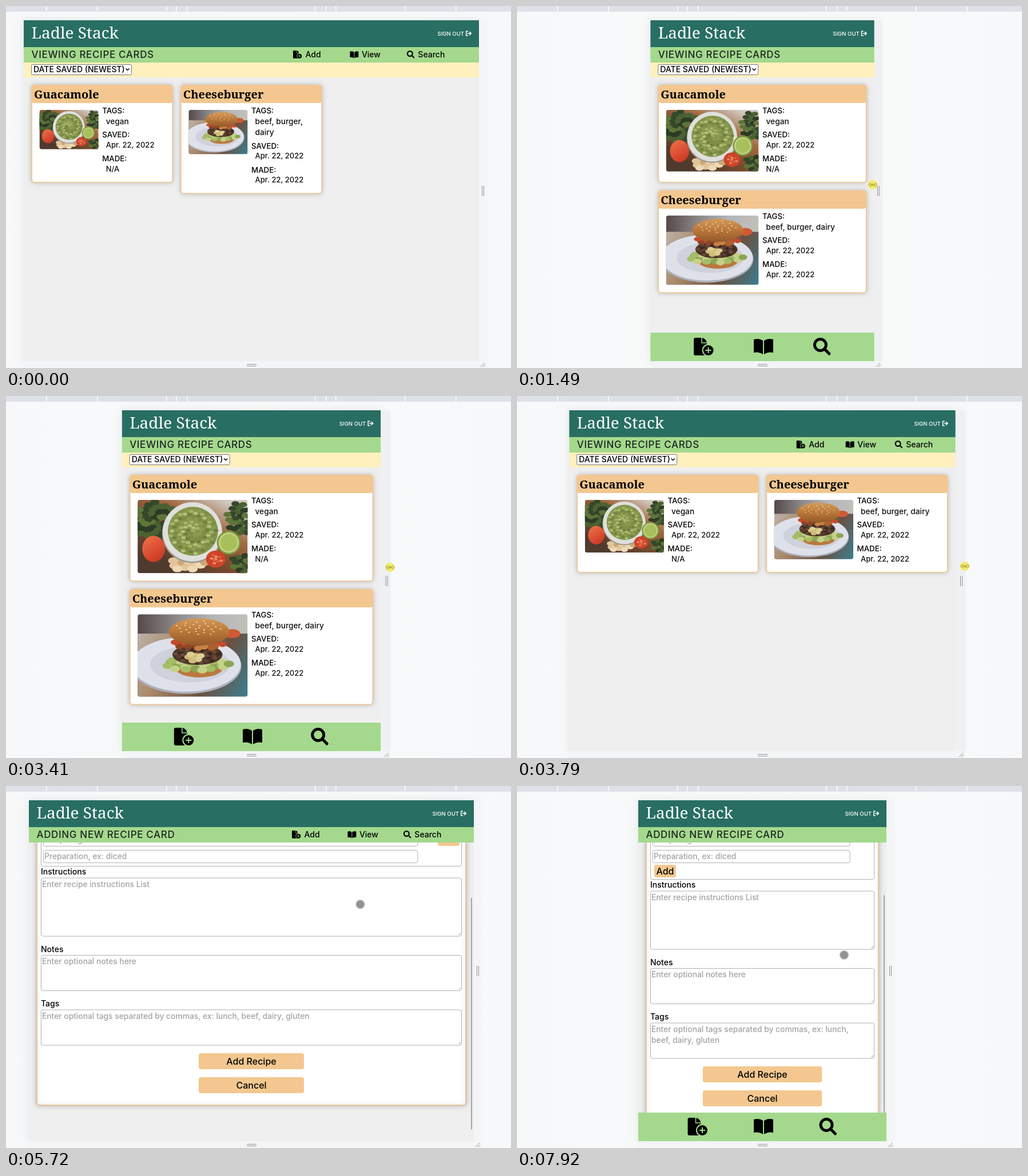
Recreate the animation shown at these times as an HTML page with a canvas. Size 883 px wide and 634 px high, loop 7990 ms.

```html
<!DOCTYPE html>
<html lang="en">
<head>
<meta charset="utf-8">
<title>Recipe cards</title>
<style>
  html, body { margin: 0; width: 100%; height: 100%; overflow: hidden; background: #f7f9f9; }
  canvas { display: block; }
</style>
</head>
<body>
<canvas id="stage" width="883" height="634"></canvas>
<script>
const ctx = document.getElementById('stage').getContext('2d');
const LOOP = 7990, MID = 429, TOP = 25, BOTTOM = 622, LAG = 45;
const ORANGE = '#f3c78f', GREEN = '#a4d98d', TEAL = '#286e62', PAGE = '#efefef';
const SANS = 'Inter, "Open Sans", sans-serif', SERIF = '"Noto Serif", serif';

// The pointer's path; the page edge follows it while it drags.
const move = (start, end, x, y) => ({ start, end, x, y });
const drag = (...args) => ({ ...move(...args), drag: true });
const moves = [
  move(130, 500, 830, 314), drag(785, 1465, 622, 313), drag(1615, 2015, 554, 300),
  move(2240, 2420, 511, 297), move(2700, 2850, 554, 302),
  drag(3010, 3815, 790, 298), drag(3815, 4115, 821, 296),
  move(4240, 4460, 618, 75), move(4460, 4600, 506, 45), move(4600, 4750, 524, 91),
  move(5100, 5400, 619, 207), move(5720, 6200, 821, 325),
  drag(6265, 7065, 649, 318), move(7660, 7920, 572, 296)
];
const drags = moves.filter(m => m.drag);

const progress = (t, a, b) => Math.min(1, Math.max(0, (t - a) / (b - a)));
const smooth = (t, a, b) => {
  const k = progress(t, a, b);
  return k * k * (3 - 2 * k);
};
function follow(path, t) {
  let x = 830, y = 345;
  for (const m of path) {
    const k = progress(t, m.start, m.end);
    x += (m.x - x) * k;
    y += (m.y - y) * k;
  }
  return { x, y };
}
const edgeAt = t => follow(drags, t).x - 3;

function rect(x, y, w, h, color) {
  ctx.fillStyle = color;
  ctx.fillRect(x, y, w, h);
}
function box(x, y, w, h, r, fill, stroke, line = 1) {
  ctx.beginPath();
  ctx.roundRect(x, y, w, h, r);
  if (fill) { ctx.fillStyle = fill; ctx.fill(); }
  if (stroke) { ctx.strokeStyle = stroke; ctx.lineWidth = line; ctx.stroke(); }
}
function oval(x, y, rx, ry, color) {
  ctx.fillStyle = color;
  ctx.beginPath();
  ctx.ellipse(x, y, rx, ry, 0, 0, 7);
  ctx.fill();
}
// Spreads small ovals evenly over an ellipse.
function scatter(n, x, y, rx, ry, size, colors) {
  for (let i = 0; i < n; i++) {
    const a = i * 2.4, r = Math.sqrt(i / n);
    oval(x + rx * r * Math.cos(a), y + ry * r * Math.sin(a), size, size * .65, colors[i % colors.length]);
  }
}
function blend(x0, y0, x1, y1, ...colors) {
  const g = ctx.createLinearGradient(x0, y0, x1, y1);
  colors.forEach((c, i) => g.addColorStop(i / (colors.length - 1), c));
  return g;
}
function lines(color, width, ...segments) {
  ctx.strokeStyle = color;
  ctx.lineWidth = width;
  ctx.beginPath();
  for (const [x, y, ...rest] of segments) {
    ctx.moveTo(x, y);
    for (let i = 0; i < rest.length; i += 2) ctx.lineTo(rest[i], rest[i + 1]);
  }
  ctx.stroke();
}
function setFont(size, weight = 500, font = SANS, gap = 0) {
  ctx.font = `${weight} ${size}px ${font}`;
  ctx.letterSpacing = gap + 'px';
}
function text(s, x, y, size, { color = '#000', weight, font, align = 'left', gap } = {}) {
  setFont(size, weight, font, gap);
  ctx.textAlign = align;
  ctx.fillStyle = color;
  ctx.fillText(s, x, y);
}
// Draws wrapped text and returns the height added below the first line.
function paragraph(s, x, y, size, max, style) {
  setFont(size);
  const rows = [''];
  for (const word of s.split(' ')) {
    const joined = (rows.at(-1) + ' ' + word).trim();
    if (rows.at(-1) && ctx.measureText(joined).width > max) rows.push(word);
    else rows[rows.length - 1] = joined;
  }
  rows.forEach((row, i) => text(row, x, y + i * 19.5, size, style));
  return (rows.length - 1) * 19.5;
}
function at(x, y, scale, draw) {
  ctx.save();
  ctx.translate(x, y);
  ctx.scale(scale, scale);
  draw();
  ctx.restore();
}
function shadowed(draw) {
  ctx.save();
  ctx.shadowColor = 'rgba(0,0,0,.25)';
  ctx.shadowBlur = 9;
  draw();
  ctx.restore();
}

const icons = {
  add() {
    box(0, 0, 23, 31, [3, 10, 3, 3], '#000');
    lines(GREEN, 1.5, [14, 0, 14, 9, 23, 9]);
    oval(25.5, 22, 11, 11, GREEN);
    oval(25.5, 22, 9, 9, '#000');
    lines(GREEN, 2, [20.5, 22, 30.5, 22], [25.5, 17, 25.5, 27]);
  },
  view() {
    ctx.fillStyle = '#000';
    for (const side of [-1, 1]) {
      ctx.beginPath();
      ctx.moveTo(17 + side, 6);
      ctx.quadraticCurveTo(17 + side * 8, 1, 17 + side * 17, 4);
      ctx.lineTo(17 + side * 17, 27);
      ctx.quadraticCurveTo(17 + side * 8, 25, 17 + side, 30);
      ctx.fill();
    }
  },
  search() {
    ctx.lineCap = 'round';
    lines('#000', 5, [20, 20, 28, 28]);
    ctx.beginPath();
    ctx.arc(12.5, 12.5, 10, 0, 7);
    ctx.stroke();
  }
};

// Photos are simple scenes, 193 units wide.
const photos = {
  guacamole() {
    const leaves = ['#34482a', '#5d7539', '#2c3c25', '#4b6132'];
    rect(0, 0, 193, 129, blend(150, 0, 80, 129, '#d0c8c1', '#a26a42', '#7b4b2d', '#4f3a2d'));
    scatter(40, 30, 36, 38, 34, 8, leaves);
    scatter(30, 180, 34, 26, 30, 7, leaves);
    scatter(14, 182, 112, 18, 18, 7, leaves);
    oval(28, 86, 20, 23, blend(10, 65, 40, 110, '#ef7049', '#c93421'));
    scatter(16, 88, 112, 34, 12, 9, ['#e2c59a', '#cda878', '#eed9b5']);
    oval(96, 59, 53, 52, '#a39c90');
    oval(96, 56, 52, 52, '#dfe0dc');
    oval(97, 55, 44, 43, '#84944c');
    scatter(90, 97, 55, 41, 40, 4, ['#a5b466', '#7b8c43', '#b4c07a', '#8c9c50', '#6f803d']);
    for (const [r, color] of [[21, '#7d973b'], [18, '#c3d184'], [15, '#a9bf5c']]) oval(160, 75, r, r, color);
    oval(137, 104, 17, 15, '#cf432a');
    scatter(9, 137, 104, 11, 9, 3, ['#ee9068', '#dc6240']);
  },
  burger() {
    rect(0, 0, 193, 145, blend(0, 0, 193, 0, '#55484a', '#8a8685', '#b3b5b6', '#c2c0bc'));
    rect(0, 34, 193, 111, blend(0, 34, 193, 145, '#bdb1a6', '#a88767', '#6a5040', '#3b7f90'));
    oval(166, 34, 14, 8, '#cf5a35');
    oval(85, 91, 97, 49, '#aeb0bc');
    oval(85, 88, 96, 48, '#dfe1ea');
    oval(92, 88, 70, 32, '#cfd1dc');
    oval(108, 94, 42, 17, '#b9783d');
    scatter(36, 104, 88, 58, 11, 9, ['#a6bd67', '#8ca552', '#c4d189']);
    oval(105, 71, 44, 18, '#4d3428');
    scatter(40, 105, 71, 40, 15, 4, ['#5d4032', '#3b2820', '#6d4b38']);
    scatter(8, 100, 76, 16, 7, 7, ['#cdbd78', '#ddd094']);
    scatter(26, 108, 52, 46, 9, 7, ['#b0602f', '#c64a2b', '#8d4526', '#c98046']);
    oval(108, 31, 53, 24, blend(0, 7, 0, 55, '#d39a57', '#b97639', '#94592b'));
    scatter(26, 108, 24, 42, 13, 1.6, ['#f1d9a4']);
  }
};

function card(x, y, w, { title, photo, ratio, tags, made }) {
  const mid = x + w / 2, imgW = w / 2 - 20.5, imgH = imgW * ratio;
  const room = w / 2 - 20, style = { color: '#111' };
  setFont(13.7);
  const extra = ctx.measureText(tags).width > room ? 19.5 : 0;
  const h = Math.max(171.5 + extra, 58.5 + imgH);
  shadowed(() => box(x, y, w, h, 5, ORANGE));
  box(x + 1.5, y + 28, w - 3, h - 29.5, 4, '#fff');
  box(x, y, w, 32, 5, ORANGE);
  text(title, x + 4.5, y + 24, 20, { font: SERIF, weight: 600 });
  ctx.save();
  box(x + 14, y + 44, imgW, imgH, 4);
  ctx.clip();
  at(x + 14, y + 44, imgW / 193, photo);
  ctx.restore();
  text('TAGS:', mid, y + 50, 13.3);
  paragraph(tags, mid + 6.5, y + 68.5, 13.7, room, style);
  [['SAVED:', 'Apr. 22, 2022'], ['MADE:', made]].forEach(([label, value], i) => {
    const row = y + extra + i * 42;
    text(label, mid, row + 92, 13.3);
    text(value, mid + 6.5, row + 109.5, 13, style);
  });
  return h;
}

const recipes = [
  { title: 'Guacamole', photo: photos.guacamole, ratio: 2 / 3, tags: 'vegan', made: 'N/A' },
  { title: 'Cheeseburger', photo: photos.burger, ratio: .75, tags: 'beef, burger, dairy', made: 'Apr. 22, 2022' }
];

function cardList(left, width) {
  rect(left, 99, width, 26, '#fff0bd');
  box(left + 13.5, 102.5, 175, 18, 2, '#fff', '#767676');
  text('DATE SAVED (NEWEST)', left + 17, 116, 14);
  lines('#000', 1.5, [left + 178.5, 109.5, left + 181.5, 112.5, left + 184.5, 109.5]);
  const gap = 13.5, cols = width < 504 ? 1 : width < 685 ? 2 : 3;
  const w = (width - gap * (cols + 1)) / cols;
  let x = left + gap, y = 138;
  for (const recipe of recipes) {
    const h = card(x, y, w, recipe);
    if (cols > 1) x += w + gap;
    else y += h + gap;
  }
}

function form(left, width, narrow, scroll) {
  const x = left + 21, w = width - 42, dy = narrow ? 23 : 0;
  const field = (y, h, hint, fx = x, fw = w) => {
    box(fx + .5, y + .5, fw - 1, h, 3, '#fff', '#b0b0b0');
    paragraph(hint, fx + 2, y + 16, 13.8, fw - 20, { color: '#a3a3a3' });
  };
  const button = (label, bx, y, bw, h) => {
    box(bx, y, bw, h, 4, ORANGE);
    text(label, bx + bw / 2, y + h / 2 + 6, 16, { align: 'center' });
  };
  ctx.save();
  ctx.translate(0, -scroll);
  shadowed(() => box(left + 14, 112, width - 28, 693 + dy, 5, '#fff', '#e6bd85', 1.5));
  ['Title', 'Image', 'Servings'].forEach((label, i) => {
    text(label, x, 135 + i * 51, 14);
    field(141 + i * 51, 22, 'Enter recipe ' + label.toLowerCase());
  });
  text('Ingredients', x, 288, 14);
  box(x + .5, 294.5, w - 1, 92 + dy, 3, '#fff', '#b0b0b0');
  ['Name, ex: onion', 'Unit, ex: grams', 'Preparation, ex: diced']
    .forEach((hint, i) => field(300 + i * 29, 22, hint, x + 4, (w - 8) * .9));
  if (narrow) button('Add', x + 7, 384, 38, 22);
  else button('Add', x + w - 42, 322, 38, 29);

  let y = 401 + dy;
  const area = (label, h, hint) => {
    text(label, x, y, 14);
    field(y + 5.5, h, hint);
    lines('#777', 1, [x + w - 5, y + h + 4, x + w - 2, y + h + 1]);
    y += h + 33.5;
  };
  area('Instructions', 102, 'Enter recipe instructions List');
  area('Notes', 62, 'Enter optional notes here');
  area('Tags', 62, 'Enter optional tags separated by commas, ex: lunch, beef, dairy, gluten');
  const bw = w * (narrow ? .532 : .25);
  ['Add Recipe', 'Cancel'].forEach((label, i) => button(label, MID - bw / 2, 714 + dy + i * 42, bw, 28));
  ctx.restore();
}

function header(left, width, right, title, narrow) {
  rect(left, TOP, width, 47, TEAL);
  text('Ladle Stack', left + 13.5, 57, 28, { color: '#fff', weight: 400, font: SERIF });
  text('SIGN OUT', right - 26, 51.5, 9.6, { color: '#fff', align: 'right' });
  at(right - 23, 43.5, 1, () => lines('#fff', 1.5,
    [4, .8, .8, .8, .8, 8.2, 4, 8.2], [3, 4.5, 9, 4.5], [6.3, 1.5, 9.3, 4.5, 6.3, 7.5]));
  rect(left, 72, width, 27, GREEN);
  text(title, left + 13.5, 91, 17, { color: '#1c2622', gap: .65 });
  if (narrow) return;
  ['Add', 'View', 'Search'].forEach((label, i) => {
    const x = right - width * (.39 - .112 * i) - 14.6 + 10.3 * i;
    at(x, 78, .44, icons[label.toLowerCase()]);
    text(label, x + 21.5 - i, 90, 14);
  });
}

function bottomNav(left, width) {
  rect(left, 572, width, 50, GREEN);
  at(407 - width / 4, 581, 1, icons.add);
  at(414, 580, 1, icons.view);
  at(420 + width / 4, 581, 1, icons.search);
}

function backdrop(left, width, frame, hover) {
  rect(0, 0, 883, 634, blend(0, 0, 883, 0, '#f6f8fa', '#f9fbfa', '#f6f8fa'));
  rect(0, 0, 883, 10, '#dfe1e8');
  for (const d of [112, 131, 148, 269, 358])
    for (const x of [MID - d, MID + d]) rect(x - 1, 0, 1.5, 9, '#fff');
  ctx.save();
  ctx.shadowColor = 'rgba(0,0,0,.08)';
  ctx.shadowBlur = 14;
  rect(left, TOP, width, 597, PAGE);
  ctx.restore();
  rect(frame, TOP, 14, 597, hover ? '#eef0f1' : '#f3f5f6');
  rect(left, BOTTOM, frame + 14 - left, 12, '#f3f5f6');
  for (const d of [0, 3])
    lines('#8d8f92', 1, [frame + 5.5 + d, 315, frame + 5.5 + d, 333], [421, 627.5 + d, 438, 627.5 + d],
      [frame + 3 + d * 1.3, 632, frame + 10 + d * .4, 625 + d * 1.2]);
}

function grip(x, y) {
  oval(x, y, 8, 8, '#f3ec68');
  for (const s of [-1, 1])
    lines('#8c8630', 1, [x - 4, y + s, x + 4, y + s], [x + 4 * s, y - 3.5, x + 7.5 * s, y, x + 4 * s, y + 3.5]);
}
function touch(x, y, pressed) {
  oval(x, y, 8, 8, 'rgba(70,70,70,.4)');
  oval(x, y, 6.5, 6.5, pressed ? 'rgba(40,40,40,.6)' : 'rgba(70,70,70,.32)');
}

function draw(t) {
  const right = edgeAt(t - LAG), width = 2 * (right - MID), left = right - width;
  // The frame runs slightly ahead of the page as it widens.
  const frame = Math.max(right, edgeAt(t - LAG + 11));
  const narrow = width < 645, adding = t >= 5040;
  const { x, y } = follow(moves, t);
  const hover = t >= 130 && x > right - 13;
  backdrop(left, width, frame, hover);
  ctx.save();
  ctx.beginPath();
  ctx.rect(left, TOP, width, 597);
  ctx.clip();
  if (adding) {
    const scroll = 246 * (narrow ? smooth(t, 7690, 7915) : smooth(t, 5200, 5690));
    form(left, width, narrow, scroll);
    const total = narrow ? 893 : 870;
    box(right - 5, 28 + scroll / total * 592, 2, 592 * 597 / total, 1, '#a5a5a5');
  } else cardList(left, width);
  header(left, width, right, adding ? 'ADDING NEW RECIPE CARD' : 'VIEWING RECIPE CARDS', narrow);
  if (narrow) bottomNav(left, width);
  ctx.restore();
  if (hover) grip(x, y);
  else if (t >= 130) touch(x, y, t >= 4890 && t < 5040);
}

function tick() {
  draw(performance.now() % LOOP);
  requestAnimationFrame(tick);
}
tick();
</script>
</body>
</html>
```
